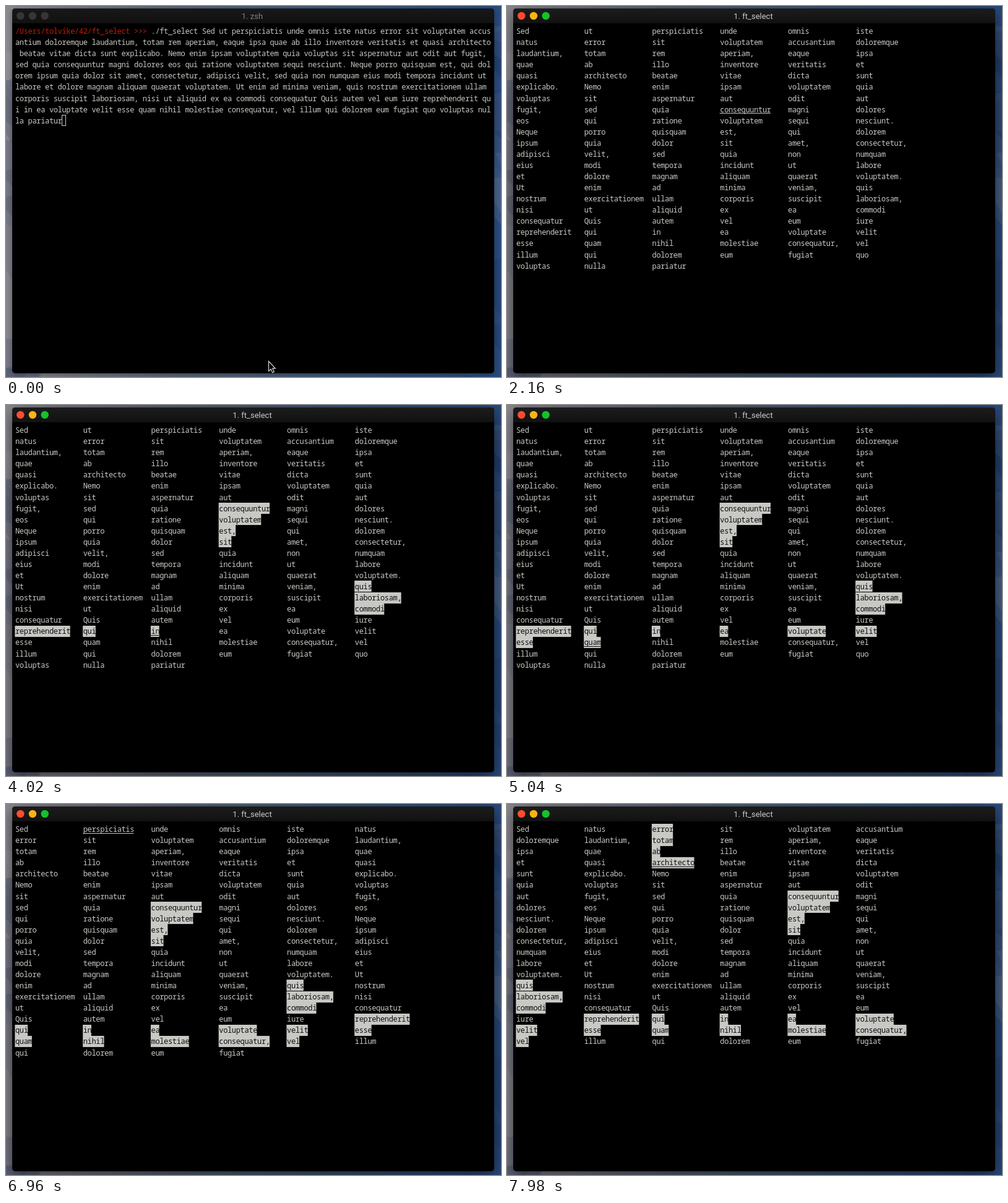
Recreate the animation shown at these times as an HTML page with a canvas. Size 800 px wide and 600 px high, loop 8000 ms.

```html
<!DOCTYPE html>
<html lang="en">
<head>
<meta charset="utf-8">
<title>Terminal word picker</title>
<style>
html, body { margin: 0; width: 100%; height: 100%; overflow: hidden; background: #000; }
canvas { display: block; }
</style>
</head>
<body>
<canvas id="stage" width="800" height="600"></canvas>
<script>
const ctx = document.getElementById('stage').getContext('2d');
const LOOP = 8000, FOCUS = 450, ENTER = 1000, RETITLE = 1700;
const X0 = 15, Y0 = 31.5, CHAR = 6.86, ROW = 18.07;
const LINE_CHARS = 112, COLS = 6, COL_CHARS = 16;
const INK = '#c8c8c4', RED = '#c41a08', MARK = '#c8c8c4';
const WIN = { x: 10, y: 4, w: 779, h: 590, bar: 24 };

const WORDS = `Sed ut perspiciatis unde omnis iste natus error sit voluptatem
accusantium doloremque laudantium, totam rem aperiam, eaque ipsa quae ab illo
inventore veritatis et quasi architecto beatae vitae dicta sunt explicabo. Nemo
enim ipsam voluptatem quia voluptas sit aspernatur aut odit aut fugit, sed quia
consequuntur magni dolores eos qui ratione voluptatem sequi nesciunt. Neque
porro quisquam est, qui dolorem ipsum quia dolor sit amet, consectetur, adipisci
velit, sed quia non numquam eius modi tempora incidunt ut labore et dolore
magnam aliquam quaerat voluptatem. Ut enim ad minima veniam, quis nostrum
exercitationem ullam corporis suscipit laboriosam, nisi ut aliquid ex ea commodi
consequatur Quis autem vel eum iure reprehenderit qui in ea voluptate velit esse
quam nihil molestiae consequatur, vel illum qui dolorem eum fugiat quo voluptas
nulla pariatur`.split(/\s+/);
const PROMPT = '/Users/tolvike/42/ft_select >>> ';
const COMMAND = PROMPT + './ft_select ' + WORDS.join(' ');

// Bursts of key presses: r right, d down, s select, x delete
const BURSTS = [
  { from: 1380, to: 3040, keys: 'r'.repeat(3) + 'd'.repeat(7) + 'sdsdsds' + 'rrddd' },
  { from: 3090, to: 4010, keys: 'ds'.repeat(3) + 'dr' + 'srsrs' },
  { from: 4080, to: 5900, keys: 'rs'.repeat(9) + 'd' },
  { from: 6140, to: 7220, keys: 'xxxx' + 'r' + 'xxx' },
  { from: 7290, to: 7960, keys: 'xx' + 'r' + 'sdsdsds' }
];
const PRESSES = BURSTS.flatMap(({ from, to, keys }) => [...keys].map((key, i) =>
  ({ key, at: from + (to - from) * i / (keys.length - 1) })));

function listAt(t) {
  const items = WORDS.map(word => ({ word, on: false }));
  let cur = 0;
  for (const { key, at } of PRESSES) {
    if (at > t) break;
    if (key === 'r') cur++;
    if (key === 'd') cur += COLS;
    if (key === 's') items[cur].on = !items[cur].on;
    if (key === 'x') items.splice(cur, 1);
    cur %= items.length;
  }
  return { items, cur };
}

function seeded(seed) {
  return () => (seed = seed * 16807 % 2147483647) / 2147483647;
}

function gradient(x1, y1, x2, y2, ...colors) {
  const g = ctx.createLinearGradient(x1, y1, x2, y2);
  colors.forEach((c, i) => g.addColorStop(i / (colors.length - 1), c));
  return g;
}

// Faceted wallpaper: grey on the left, blue on the right
function desktop() {
  const rand = seeded(42);
  ctx.fillStyle = gradient(0, 0, 800, 0, '#88868e', '#5c6676', '#3c5878', '#284a7c');
  ctx.fillRect(0, 0, 800, 600);
  for (let i = 0; i < 24; i++) {
    const x = i % 2 * 800, y = rand() * 600;
    ctx.fillStyle = i % 3 ? 'rgba(20,40,80,.14)' : 'rgba(170,160,170,.12)';
    ctx.beginPath();
    ctx.moveTo(x - 60, y);
    ctx.lineTo(x + 60, y + 80 * (rand() - .5));
    ctx.lineTo(x + 20, y + 60 + 90 * rand());
    ctx.fill();
  }
}

function fillBox(x, y, w, h, radius) {
  ctx.beginPath();
  ctx.roundRect(x, y, w, h, radius);
  ctx.fill();
}

function windowFrame(focused, title) {
  const { x, y, w, h, bar } = WIN;
  ctx.save();
  ctx.shadowColor = focused ? 'rgba(0,0,0,.6)' : 'rgba(0,0,0,.35)';
  ctx.shadowBlur = focused ? 26 : 10;
  ctx.shadowOffsetY = focused ? 6 : 2;
  ctx.fillStyle = '#000';
  fillBox(x, y, w, h, 5);
  ctx.restore();

  ctx.fillStyle = gradient(0, y, 0, y + bar, focused ? '#1c1c1c' : '#181818', '#111111');
  fillBox(x, y, w, bar, [5, 5, 0, 0]);

  ['#ff4c30', '#fcb414', '#14c22c'].forEach((color, i) => {
    ctx.fillStyle = focused ? color : '#363636';
    ctx.beginPath();
    ctx.arc(23.3 + 19.7 * i, 16, 6.2, 0, Math.PI * 2);
    ctx.fill();
  });

  ctx.font = '13px Roboto, sans-serif';
  ctx.letterSpacing = '0px';
  ctx.textAlign = 'center';
  ctx.fillStyle = focused ? '#cacaca' : '#828282';
  ctx.fillText(title, 398, 21);
}

function monoFont() {
  ctx.font = '12px "Noto Sans Mono", "DejaVu Sans Mono", monospace';
  ctx.textAlign = 'left';
  ctx.letterSpacing = '0px';
  ctx.letterSpacing = CHAR - ctx.measureText('m').width + 'px';
}

const cellX = col => X0 + col * CHAR;
const cellY = row => Y0 + row * ROW;

function print(text, col, row, color) {
  ctx.fillStyle = color;
  ctx.fillText(text, cellX(col), cellY(row) + 13.6);
}

function shell(focused) {
  const rows = Math.ceil(COMMAND.length / LINE_CHARS);
  for (let row = 0; row < rows; row++) {
    const start = row ? row * LINE_CHARS : PROMPT.length;
    print(COMMAND.slice(start, (row + 1) * LINE_CHARS), start % LINE_CHARS, row, INK);
  }
  print(PROMPT, 0, 0, RED);

  const x = Math.round(cellX(COMMAND.length % LINE_CHARS));
  const y = Math.round(cellY(rows - 1));
  ctx.fillStyle = ctx.strokeStyle = INK;
  ctx.lineWidth = 1;
  if (focused) ctx.fillRect(x, y, 7, 18);
  else ctx.strokeRect(x + .5, y + .5, 6, 17);
}

function picker(t) {
  const { items, cur } = listAt(t);
  items.forEach(({ word, on }, i) => {
    const col = i % COLS * COL_CHARS, row = Math.floor(i / COLS);
    const x = cellX(col) - .6, y = Math.round(cellY(row)), w = word.length * CHAR;
    if (on) {
      ctx.fillStyle = MARK;
      ctx.fillRect(x, y, w, ROW);
    }
    print(word, col, row, on ? '#101010' : INK);
    if (i === cur) ctx.fillRect(x, y + 15, w, 1);
  });
}

function pointer(x, y) {
  ctx.save();
  ctx.translate(x, y);
  const arrow = new Path2D('M0 0V16L3.6 12.7 6.2 18.5 8.8 17.3 6.3 11.7H10.8Z');
  ctx.fillStyle = '#000';
  ctx.fill(arrow);
  ctx.strokeStyle = '#dcdcdc';
  ctx.lineWidth = 1.2;
  ctx.stroke(arrow);
  ctx.restore();
}

function draw(t) {
  const focused = t >= FOCUS;
  desktop();
  windowFrame(focused, t < RETITLE ? '1. zsh' : '1. ft_select');
  monoFont();
  if (t < ENTER) {
    shell(focused);
    pointer(424.5, 574.5);
  } else {
    picker(t);
  }
}

const start = performance.now();
function tick() {
  draw((performance.now() - start) % LOOP);
  requestAnimationFrame(tick);
}
tick();
</script>
</body>
</html>
```
